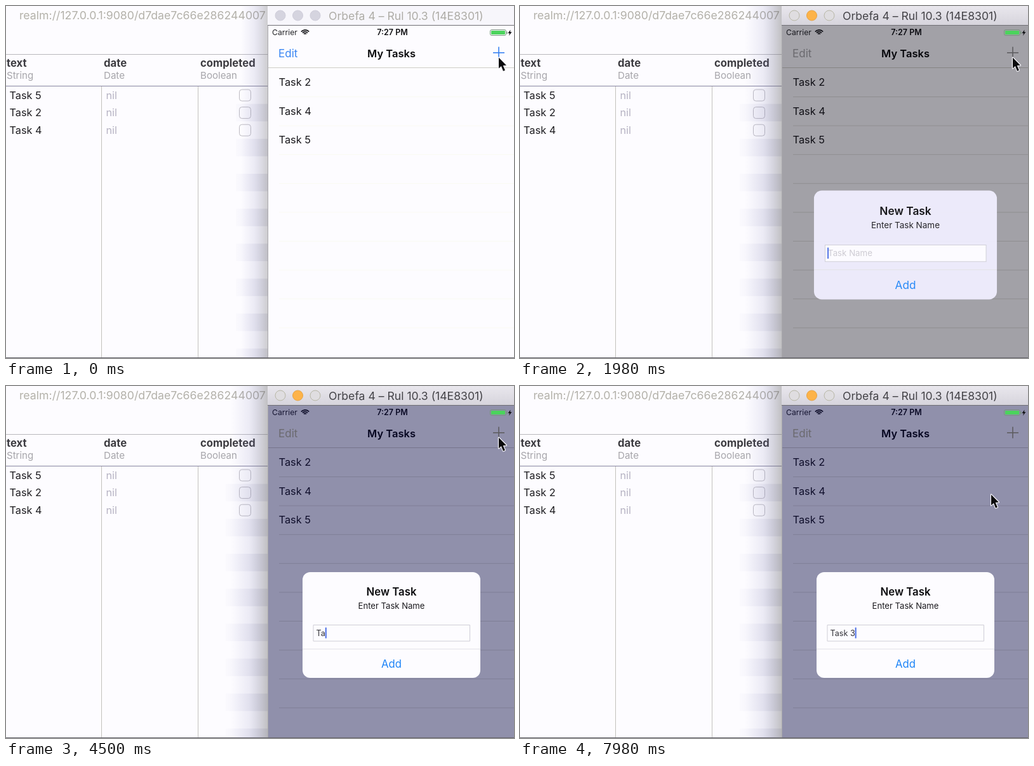
Write an HTML page with a canvas that moves like this. It is 800x556 px and loops after 8000 ms.

```html
<!DOCTYPE html>
<html lang="en">
<head>
<meta charset="utf-8">
<title>Task list sync</title>
<style>
  html, body { margin: 0; width: 100%; height: 100%; overflow: hidden; background: #fdfcff; }
  canvas { display: block; }
</style>
</head>
<body>
<canvas id="stage" width="800" height="556"></canvas>
<script>
const ctx = document.getElementById('stage').getContext('2d');
const LOOP = 8000;
const WHITE = '#fdfcff';
const PHONE_X = 412;
const ROW_H = 27.6;

// Moments of the scene, in ms
const ACTIVATE = 1040, PRESS = 1640, ALERT = 1800, SETTLED = 2100, MOVE = 7660;
const KEYS = [[3120, 'T'], [4240, 'Ta'], [5080, 'Tas'], [5900, 'Task'], [6360, 'Task '], [6980, 'Task 3']];

function tween(t, stops) {
  if (t <= stops[0][0]) return stops[0][1];
  for (let i = 1; i < stops.length; i++) {
    const [t0, v0] = stops[i - 1], [t1, v1] = stops[i];
    if (t < t1) return v0 + (v1 - v0) * (t - t0) / (t1 - t0);
  }
  return stops[stops.length - 1][1];
}

function text(str, x, y, size, color, weight = 400, align = 'left') {
  ctx.font = `${weight} ${size}px Inter, sans-serif`;
  ctx.fillStyle = color;
  ctx.textAlign = align;
  ctx.fillText(str, x, y);
}

function rect(x, y, w, h, color) {
  ctx.fillStyle = color;
  ctx.fillRect(x, y, w, h);
}

function round(x, y, w, h, r, fill, stroke) {
  ctx.beginPath();
  ctx.roundRect(x, y, w, h, r);
  if (fill) { ctx.fillStyle = fill; ctx.fill(); }
  if (stroke) { ctx.strokeStyle = stroke; ctx.lineWidth = 1; ctx.stroke(); }
}

function polygon(points, fill, stroke) {
  ctx.beginPath();
  points.forEach(([x, y]) => ctx.lineTo(x, y));
  ctx.closePath();
  if (stroke) { ctx.strokeStyle = stroke; ctx.lineWidth = 2.5; ctx.lineJoin = 'round'; ctx.stroke(); }
  ctx.fillStyle = fill;
  ctx.fill();
}

function gradient(x0, y0, x1, y1, ...colors) {
  const g = ctx.createLinearGradient(x0, y0, x1, y1);
  colors.forEach((c, i) => g.addColorStop(i / (colors.length - 1), c));
  return g;
}

function drawTable(active) {
  text('realm://127.0.0.1:9080/d7dae7c66e286244007', 21, 20.5, 17.7, '#b3b1a9');
  rect(0, 76, PHONE_X, 1, '#b9b8bd');
  [['text', 'String', 1], ['date', 'Date', 154], ['completed', 'Boolean', 306]].forEach(([name, type, x]) => {
    text(name, x, 95.5, 16.7, '#3c3b40', 700);
    text(type, x, 115, 15.1, '#a6a5aa');
  });
  ['Task 5', 'Task 2', 'Task 4'].forEach((task, i) => {
    const y = 146.5 + i * ROW_H;
    text(task, 5.5, y, 16.3, '#1f1e22');
    text('nil', 157.5, y, 16.3, '#b5b2c2');
    round(367.5, y - 14.5, 18, 18, 4, WHITE, '#bdbbc2');
  });
  rect(0, 126, PHONE_X, 1, '#8785a0');
  rect(150, 127, 1, 429, '#c3c2bd');
  rect(302, 127, 1, 429, '#c3c2bd');

  // Shadow cast by the phone window, stronger on every other row
  const left = active ? 354 : 370;
  const shade = gradient(left, 0, PHONE_X, 0, 'rgba(120,120,190,0)',
    'rgba(110,110,170,.12)', `rgba(95,95,95,${active ? .38 : .3})`);
  rect(left, 0, PHONE_X - left, 556, shade);
  const stripe = gradient(left - 8, 0, PHONE_X, 0, 'rgba(110,110,190,.02)', 'rgba(100,100,130,.13)');
  for (let y = 127 + ROW_H; y < 556; y += 2 * ROW_H)
    rect(left - 8, y, PHONE_X - left + 8, ROW_H, stripe);
}

function drawTitleBar(active) {
  rect(PHONE_X, 0, 388, 30, active ? gradient(0, 0, 0, 30, '#e9e7ed', '#d6d4dc') : '#f7f6fb');
  rect(PHONE_X, 30, 388, 1, '#6f6e74');
  [432, 459.5, 487].forEach((x, i) => {
    const fill = !active ? '#d5d4df' : i === 1 ? '#fdb349' : '#dfdde0';
    const stroke = !active ? '#cfcdda' : i === 1 ? '#e5a345' : '#b8b7a6';
    round(x - 8, 7, 16, 16, 8, fill, stroke);
  });
  text('Orbefa 4 – Rul 10.3 (14E8301)', 508, 22, 17.6, active ? '#444348' : '#aeaca6');
}

function drawStatus() {
  text('Carrier', 419, 46, 12.2, '#222226');
  text('7:27 PM', 608.5, 46, 12.5, '#111114', 600, 'center');
  ctx.strokeStyle = '#111114';
  ctx.lineWidth = 1.7;
  [2.5, 5.3, 8.2].forEach(r => {
    ctx.beginPath();
    ctx.arc(471, 46, r, -Math.PI * .77, -Math.PI * .23);
    ctx.stroke();
  });
}

function drawBattery() {
  round(762.5, 37.5, 25, 9, 2.5, null, '#77957d');
  round(764, 39, 22, 6, 1, '#4bd35c');
  rect(788.5, 40.5, 1.2, 3.5, '#77957d');
  polygon([[794.5, 37.5], [790.5, 43], [793, 43], [792, 47], [796.5, 41], [794, 41]], '#151518');
}

function drawPhone(t, active) {
  rect(PHONE_X, 0, 388, 556, WHITE);
  drawTitleBar(active);
  const dimmed = t >= ALERT;
  const dim = tween(t, [[ALERT, 0], [1980, .36], [SETTLED, .43]]);

  for (let i = 0; i < 9; i++) rect(430, 143 + i * 45.6, 370, 1, dimmed ? '#dfdeda' : '#fafaf2');
  rect(PHONE_X, 97, 388, 1, '#cfcec6');
  ['Task 2', 'Task 4', 'Task 5'].forEach((task, i) => text(task, 429.5, 126 + i * 45.7, 16.4, '#1c1b1f'));
  text('My Tasks', 607, 81, 16.5, '#08080a', 600, 'center');
  drawStatus();

  rect(PHONE_X + 1, 31, 387, 525, `rgba(0,0,${t < SETTLED ? 12 : 60},${dim})`);

  text('Edit', 429, 81, 17, dimmed ? '#6b6a6f' : '#3a86f3');
  const plus = dimmed ? '#5e5d60' : t >= PRESS ? '#c6d4f6' : '#3982f2';
  rect(767, 73, 18, 1.6, plus);
  rect(775.2, 64.5, 1.6, 18, plus);
  drawBattery();
  rect(PHONE_X, 31, 1, 525, '#aaa9ad');
}

function drawAlert(t) {
  if (t < ALERT) return;
  const scale = tween(t, [[ALERT, 1.18], [1880, 1.08], [1980, 1.029], [SETTLED, 1.012], [2380, 1.004], [2500, 1]]);
  const typed = KEYS.reduce((last, [at, str]) => t >= at ? str : last, '');
  ctx.save();
  ctx.globalAlpha = tween(t, [[ALERT, 0], [1980, .94], [2060, 1]]);
  ctx.translate(607, 377.7);
  ctx.scale(scale, scale);
  ctx.translate(-607, -377.7);
  round(467, 294, 280, 167, 12, t < SETTLED ? '#f2f0ff' : WHITE);
  text('New Task', 607, 331, 16.8, '#0c0c0f', 600, 'center');
  text('Enter Task Name', 607, 352, 13.1, '#1c1b1f', 400, 'center');
  round(484, 377.5, 246.5, 25.5, 0, WHITE, '#cfced6');
  text(typed || 'Task Name', 488.5, 395, typed ? 12.6 : 12.9, typed ? '#333238' : '#cbc9d0');
  const caret = typed ? 489 + ctx.measureText(typed).width : 488;
  rect(caret - .5, 381.5, 2, 17, '#4c6ee6');
  rect(467, 415, 280, 1, '#e4e3e8');
  text('Add', 607, 445, 16.7, '#1d84f7', 400, 'center');
  ctx.restore();
}

function drawPointer(t) {
  const p = tween(t, [[MOVE, 0], [7980, 1]]);
  const ease = p * p * (3 - 2 * p);
  ctx.save();
  ctx.translate(776 - 34 * ease, 81.5 + 90 * ease);
  ctx.scale(.92, .92);
  polygon([[0, 0], [0, 18.5], [4.3, 14.6], [7.6, 23], [10.8, 21.7], [7.3, 13.6], [13, 13.2]], '#0a0a0c', '#fbfaff');
  ctx.restore();
}

function frame(now) {
  const t = now % LOOP;
  const active = t >= ACTIVATE;
  rect(0, 0, 800, 556, WHITE);
  drawTable(active);
  drawPhone(t, active);
  drawAlert(t);
  rect(0, 555, 800, 1, '#66656e');
  drawPointer(t);
  requestAnimationFrame(frame);
}
requestAnimationFrame(frame);
</script>
</body>
</html>
```
